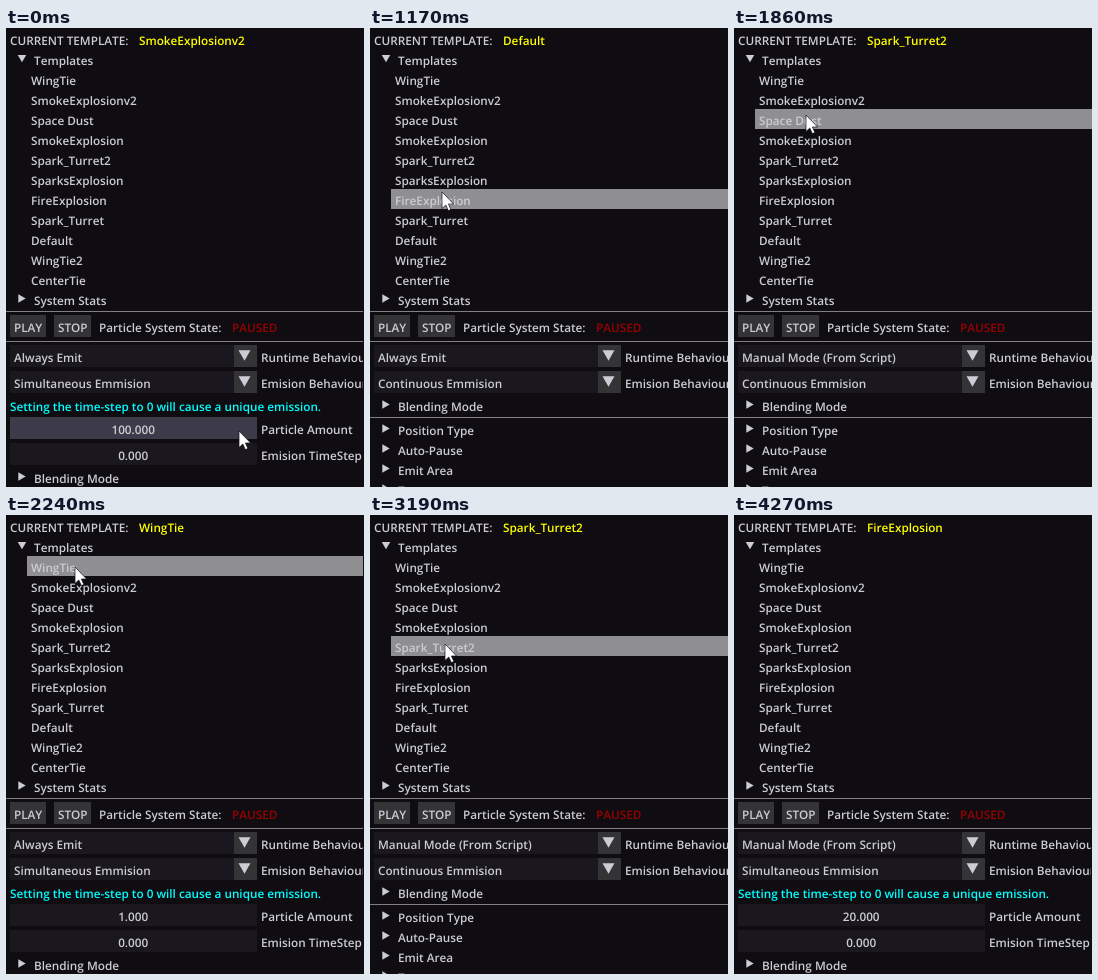
An HTML page that plays this animation: 358x459 px, repeating every 4.73 s.

```html
<!DOCTYPE html>
<html lang="en">
<head>
<meta charset="utf-8">
<title>Particle editor panel</title>
<style>
html, body { margin: 0; width: 100%; height: 100%; overflow: hidden; background: #0f0d12; }
svg { display: block; width: 358px; height: 459px; }
text {
  font: 600 11.75px "Open Sans", "Noto Sans", sans-serif;
  font-kerning: none;
  fill: #ccccd4;
  white-space: pre;
  text-rendering: geometricPrecision;
}
</style>
</head>
<body>
<svg id="stage" viewBox="0 0 358 459"></svg>
<script>
const LOOP = 4730;
const FIELD = '#1a171f', FIELD_HOVER = '#3d3b4a', BUTTON = '#343437';
const ROW_HOVER = '#8f8f92', LINE = '#808083', TEXT = '#ccccd4';

const names = ['WingTie', 'SmokeExplosionv2', 'Space Dust', 'SmokeExplosion',
  'Spark_Turret2', 'SparksExplosion', 'FireExplosion', 'Spark_Turret',
  'Default', 'WingTie2', 'CenterTie'];

// An amount means simultaneous emission; without one it is continuous.
const presets = {
  SmokeExplosionv2: { amount: '100.000' },
  Default: {},
  Spark_Turret2: { manual: true },
  WingTie: { amount: '1.000' },
  SmokeExplosion: { manual: true, amount: '20.000' },
  FireExplosion: { manual: true, amount: '20.000' }
};

const easeIn = p => p * p;
const easeOut = p => p * (2 - p);

// Pointer moves, shown in even steps; a picked template loads on the last step.
const start = { x: 233, y: 403, name: 'SmokeExplosionv2' };
const moves = [
  { from: 70, to: 150, steps: 2, x: 111, y: 175, ease: easeOut },
  { from: 620, to: 850, steps: 4, x: 66, y: 213, ease: easeIn, pick: 'Default' },
  { from: 1080, to: 1460, steps: 6, x: 76, y: 136, ease: easeOut, pick: 'Spark_Turret2' },
  { from: 1710, to: 2010, steps: 5, x: 69, y: 49, ease: easeIn, pick: 'WingTie' },
  { from: 2240, to: 2640, steps: 6, x: 75, y: 112, ease: easeIn, pick: 'SmokeExplosion' },
  { from: 2870, to: 3020, steps: 3, x: 75, y: 129, ease: easeOut },
  { from: 3190, to: 3191, steps: 1, x: 75, y: 129, ease: easeOut, pick: 'Spark_Turret2' },
  { from: 3430, to: 3720, steps: 5, x: 78, y: 172, ease: easeIn, pick: 'FireExplosion' },
  { from: 4030, to: 4270, steps: 4, x: 473, y: 634, ease: easeIn }
];

function stateAt(t) {
  let { x, y, name } = start;
  for (const m of moves) {
    if (t < m.from) break;
    const last = m.steps - 1;
    const k = Math.min(last, Math.floor((t - m.from) * last / (m.to - m.from)));
    const p = m.ease(Math.min(1, (k + 1) / (m.pick ? last : m.steps)));
    x += (m.x - x) * p;
    y += (m.y - y) * p;
    if (m.pick && k === last) name = m.pick;
  }
  return { x: Math.round(x), y: Math.round(y), name };
}

const stage = document.getElementById('stage');

function add(tag, attrs, parent = stage) {
  const el = document.createElementNS('http://www.w3.org/2000/svg', tag);
  for (const k in attrs) el.setAttribute(k, attrs[k]);
  parent.appendChild(el);
  return el;
}

const group = () => add('g', {});
const rect = (x, y, width, height, fill, parent) =>
  add('rect', { x, y, width, height, fill }, parent);

function label(x, y, str, parent, color = TEXT) {
  const el = add('text', { x, y, style: 'fill:' + color }, parent);
  el.textContent = str;
  return el;
}

function triangle(cx, cy, r, down, parent) {
  const a = r * 0.75, b = r * 0.866;
  const pts = down ? [0, a, -b, -a, b, -a] : [a, 0, -a, b, -a, -b];
  add('polygon', {
    points: pts.map((v, i) => v + (i % 2 ? cy : cx)).join(' '), fill: TEXT
  }, parent);
}

function node(y, str, parent, open = false) {
  triangle(16, y - 6.4, 4.9, open, parent);
  label(28, y, str, parent);
}

function combo(y, title) {
  rect(4, y, 247, 22, FIELD);
  rect(228, y, 23, 22, BUTTON);
  triangle(238.5, y + 10.5, 6.9, true);
  label(255, y + 17, title);
  return label(8, y + 17, '');
}

function field(y, title, value, parent) {
  const box = rect(4, y, 247, 22, FIELD, parent);
  const text = label(127.2, y + 17, value, parent);
  text.setAttribute('text-anchor', 'middle');
  label(255, y + 17, title, parent);
  return { box, text };
}

function button(x, width, str) {
  rect(x, 287, width, 22, BUTTON);
  label(x + 4, 304, str);
}

rect(0, 0, 358, 459, '#0f0d12');
const bar = rect(21, 0, 337, 20, ROW_HOVER);
label(4, 17, 'CURRENT TEMPLATE:');
const current = label(133, 17, '', stage, '#ffff00');
node(37, 'Templates', stage, true);
names.forEach((name, i) => label(25, 57 + 20 * i, name));
node(277, 'System Stats');
rect(0, 283, 358, 1, LINE);
button(4, 36, 'PLAY');
button(48, 37, 'STOP');
label(93, 304, 'Particle System State:');
label(226, 304, 'PAUSED', stage, '#990000');
rect(0, 313, 358, 1, LINE);
const runtime = combo(317, 'Runtime Behaviour');
const emission = combo(343, 'Emision Behaviour');

const burst = group();
label(4, 383, 'Setting the time-step to 0 will cause a unique emission.', burst, '#00ffff');
const amount = field(389, 'Particle Amount', '', burst);
field(415, 'Emision TimeStep', '0.000', burst);
node(455, 'Blending Mode', burst);

const steady = group();
node(383, 'Blending Mode', steady);
rect(0, 389, 358, 1, LINE, steady);
['Position Type', 'Auto-Pause', 'Emit Area', 'Texture']
  .forEach((s, i) => node(407 + 20 * i, s, steady));

const edge = rect(357, 0, 1, 459, '#0f0d12');
const pointer = add('path', {
  d: 'M0 0V16.5L3.8 13L6.3 18.6L8.9 17.5L6.4 12H11.6Z',
  fill: '#fff', stroke: '#111', 'stroke-width': 0.7
});

const show = (el, on) => el.setAttribute('display', on ? 'inline' : 'none');

function draw(t) {
  const { x, y, name } = stateAt(t);
  const preset = presets[name];
  const row = Math.floor((y - 41) / 20);

  current.textContent = name;
  runtime.textContent = preset.manual ? 'Manual Mode (From Script)' : 'Always Emit';
  emission.textContent = (preset.amount ? 'Simultaneous' : 'Continuous') + ' Emmision';
  amount.text.textContent = preset.amount || '';
  amount.box.setAttribute('fill', x < 251 && y >= 389 && y < 411 ? FIELD_HOVER : FIELD);

  show(burst, preset.amount);
  show(steady, !preset.amount);
  show(edge, preset.amount);
  show(bar, x >= 21 && row >= 0 && row < names.length);
  bar.setAttribute('y', 41 + 20 * row);
  pointer.setAttribute('transform', `translate(${x} ${y})`);
}

function tick() {
  draw(performance.now() % LOOP);
  requestAnimationFrame(tick);
}
tick();
</script>
</body>
</html>
```
